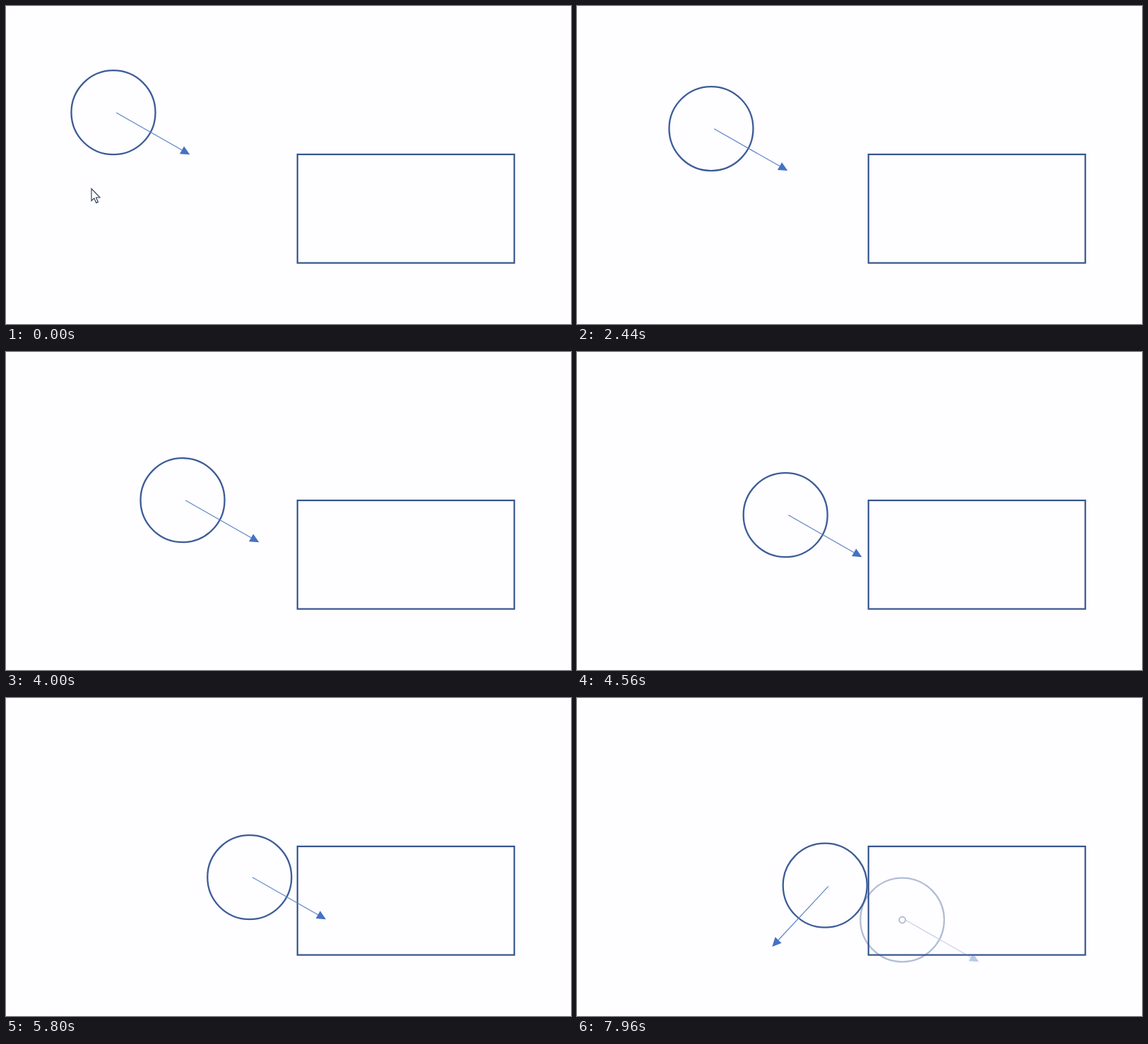
Write an HTML page that moves like this. It is 800 px wide and 450 px high and loops after 8000 ms.

```html
<!DOCTYPE html>
<html lang="en">
<head>
<meta charset="utf-8">
<title>Circle meets rectangle</title>
<style>
  html, body { margin: 0; width: 100%; height: 100%; overflow: hidden; background: #fefdff; }
  svg { display: block; width: 100%; height: 100%; }
</style>
</head>
<body>
<svg viewBox="0 0 800 450" fill="none">
  <rect x="412.7" y="210" width="307" height="153.6" stroke="#35548d" stroke-width="2.2"/>
  <g id="ghost" stroke="#2f528f">
    <circle cx="460.6" cy="314" r="59.3" stroke-width="2.3"/>
    <circle cx="460.6" cy="314" r="4.4" stroke-width="2"/>
    <g id="ghostArrow"></g>
  </g>
  <circle id="ball" r="59.5" stroke="#3c5c97" stroke-width="2.3"/>
  <g id="arrow"></g>
  <path id="cursor" d="M121 258.5V275.6L124.8 272L127.8 278.6L130.4 277.4L127.6 271H133Z"
        fill="#fff" stroke="#33465e" stroke-width="1.2"/>
</svg>
<script>
const LOOP = 8000;
const CURSOR_GONE = 360;
const MORPH = 2000;
const byId = id => document.getElementById(id);
const clamp = v => Math.min(1, Math.max(0, v));
const mix = (a, b, k) => a + (b - a) * k;
const mixPoint = (a, b, k) => [mix(a[0], b[0], k), mix(a[1], b[1], k)];

// Circle centres at rest; each move starts at its own time.
const stops = [[152, 150.7], [250, 209.7], [345.3, 253.9], [351.2, 265.2]];
const starts = [1960, 4000, 6080];
const tailOffset = [4.2, 0.2], tipOffset = [108.3, 59.5];
const finalTail = [356, 266.3], finalTip = [276, 352];

// Cubic bezier (.25, .1, .25, 1), solved by bisection.
function ease(x) {
  if (x <= 0 || x >= 1) return clamp(x);
  const bez = (a, b, s) => 3 * a * s * (1 - s) ** 2 + 3 * b * s * s * (1 - s) + s ** 3;
  let lo = 0, hi = 1;
  for (let i = 0; i < 24; i++) {
    const mid = (lo + hi) / 2;
    if (bez(0.25, 0.25, mid) < x) lo = mid; else hi = mid;
  }
  return bez(0.1, 1, lo);
}

function drawArrow(group, tail, tip) {
  if (!group.firstChild) {
    group.innerHTML = '<path stroke="#5b82c6"/><path fill="#4472c4" stroke="none"/>';
  }
  const dx = tip[0] - tail[0], dy = tip[1] - tail[1];
  const length = Math.hypot(dx, dy);
  const scale = Math.min(1, length / 118);
  const ux = dx / length, uy = dy / length;
  const bx = tip[0] - ux * 13 * scale, by = tip[1] - uy * 13 * scale;
  const wx = -uy * 6.2 * scale, wy = ux * 6.2 * scale;
  const [line, head] = group.children;
  line.setAttribute('d', `M${tail}L${bx} ${by}`);
  line.setAttribute('stroke-width', 1.15 * scale);
  head.setAttribute('d', `M${tip}L${bx + wx} ${by + wy}L${bx - wx} ${by - wy}Z`);
}

function render(t) {
  const k = starts.map(s => ease((t - s) / MORPH));
  let center = stops[0];
  k.forEach((p, i) => { center = mixPoint(center, stops[i + 1], p); });
  byId('ball').setAttribute('cx', center[0]);
  byId('ball').setAttribute('cy', center[1]);

  // The arrow follows the circle, then swings to its final direction.
  const base = k[2] > 0 ? stops[2] : center;
  const attach = o => [base[0] + o[0], base[1] + o[1]];
  drawArrow(byId('arrow'),
    mixPoint(attach(tailOffset), finalTail, k[2]),
    mixPoint(attach(tipOffset), finalTip, k[2]));

  byId('ghost').setAttribute('opacity', 0.37 * clamp((t - 6750) / 1150));
  byId('cursor').setAttribute('visibility', t < CURSOR_GONE ? 'visible' : 'hidden');
}

drawArrow(byId('ghostArrow'), [465.5, 314.5], [569, 373.3]);
const begin = performance.now();
function tick() {
  render((performance.now() - begin) % LOOP);
  requestAnimationFrame(tick);
}
tick();
</script>
</body>
</html>
```
